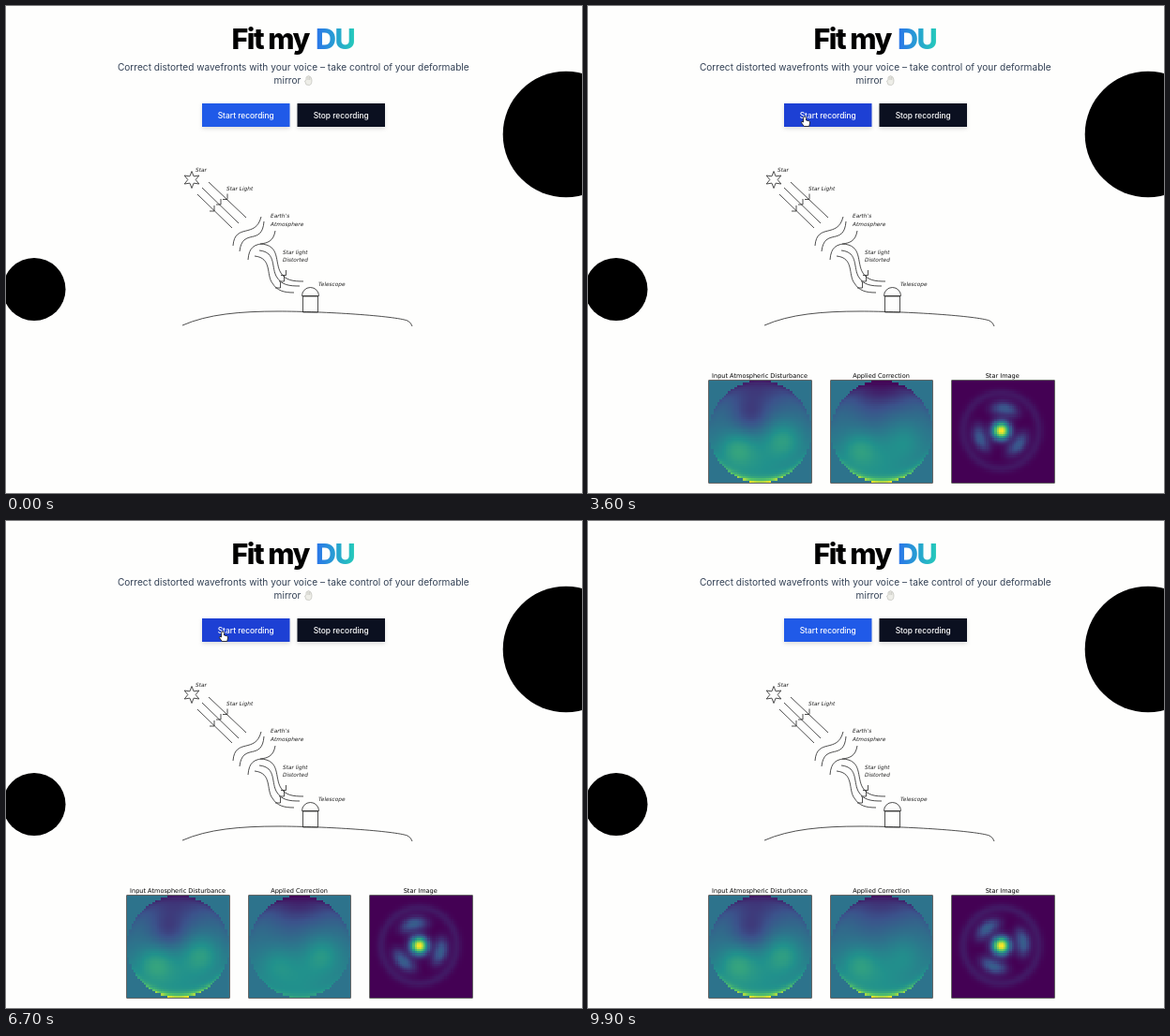
An HTML page with a canvas for the animation above (10 s loop, 614 by 520 pixels).

```html
<!DOCTYPE html>
<html lang="en">
<head>
<meta charset="utf-8">
<style>
  html, body { margin: 0; width: 100%; height: 100%; overflow: hidden; background: #fefefd; }
  svg { position: absolute; left: 0; top: 0; font-family: Inter, sans-serif; }
  canvas {
    position: absolute; top: 400px; width: 108.5px; height: 108.5px;
    image-rendering: pixelated; box-shadow: 0 0 0 .6px #000;
  }
  .title { font-size: 30.5px; font-weight: 800; letter-spacing: -.05em; }
  .lead { font-size: 10.15px; fill: #334155; text-anchor: middle; }
  .button rect { width: 93.5px; height: 25px; filter: drop-shadow(0 2px 2px #0002); }
  .button text { font-size: 8.4px; font-weight: 500; fill: #fff; text-anchor: middle; }
  .sketch { fill: none; stroke: #222; stroke-width: .8; }
  .notes { font: italic 5.8px "DejaVu Sans", sans-serif; fill: #222; }
  .captions { font: 6.55px "DejaVu Sans", sans-serif; text-anchor: middle; }
</style>
</head>
<body>
<svg width="614" height="520" viewBox="0 0 614 520">
  <defs>
    <linearGradient id="accent" gradientUnits="userSpaceOnUse" x1="330" x2="373" y1="0" y2="0">
      <stop stop-color="#2b74ea"/><stop offset="1" stop-color="#24cdb8"/>
    </linearGradient>
  </defs>
  <g class="title">
    <text x="240.5" y="45.5">Fit my</text>
    <text x="330" y="45.5" fill="url(#accent)">DU</text>
  </g>
  <g class="lead">
    <text x="306.3" y="69">Correct distorted wavefronts with your voice – take control of your deformable</text>
    <text x="300" y="83">mirror</text>
  </g>
  <path d="M320 84 L318.5 80 L320 79 V76 Q322.5 73 325 76 L326 79 Q326 84 323.5 84.5 Z M322 75.5 V79 M323.7 75.5 V79" fill="#eeeee8" stroke="#b8b8b0" stroke-width=".6"/>

  <g class="button" id="start"><rect x="209" y="104"/><text x="255.7" y="119.5">Start recording</text></g>
  <g class="button" id="stop"><rect x="310.5" y="104"/><text x="357.2" y="119.5">Stop recording</text></g>

  <g class="sketch">
    <path id="star"/>
    <path d="M216 188 L256 226 M209 194 L248 232 M204 201 L241 237"/>
    <path d="M231 206.5 H236 V200.5 M224 212 H229 V206 M217 219 H222 V213"/>
    <path d="M242 256 C244 231 266 249 272 225 M249 262 C252 236 273 257 275 230 M258 271 C260 243 283 264 287 240"/>
    <path d="M271 254 C293 255 286 274 293 285 C298 293 306 294 317 294"/>
    <path d="M270 261 C289 263 282 280 289 290 C294 298 302 299 313 299"/>
    <path d="M265 267 C284 269 277 287 284 296 C289 304 296 306 307 306"/>
    <path d="M293 287.5 H298.5 V282 M291 294 H296.5 V288 M287 301 H292.5 V295"/>
    <path d="M315.5 309.5 A9 9 0 0 1 333.5 309.5 Z M316.5 310 V327 H332.5 V310 Z"/>
    <path d="M188 341 C215 329 250 326 290 326 C340 326 415 331 428 336 Q432 338 433 342"/>
  </g>
  <g class="notes">
    <text x="202" y="177">Star</text>
    <text x="235" y="197">Star Light</text>
    <text x="282" y="226">Earth's</text>
    <text x="282" y="234.5">Atmosphere</text>
    <text x="295" y="264.5">Star light</text>
    <text x="295" y="273">Distorted</text>
    <text x="333" y="298.5">Telescope</text>
  </g>

  <g class="captions" id="captions">
    <text x="183" y="396.7">Input Atmospheric Disturbance</text>
    <text x="312.5" y="396.7">Applied Correction</text>
    <text x="441.7" y="396.7">Star Image</text>
  </g>

  <path id="hand" d="M0 0 Q1.5 0 1.5 1.5 V4 L4.5 4.8 Q6 5.3 5.5 7 L4.7 10.5 H-.7 L-3.5 6.7 Q-4 4.5 -1.5 6 V1.5 Q-1.5 0 0 0 Z" fill="#fff" stroke="#111" stroke-width=".8"/>
  <circle cx="597" cy="137" r="67.3"/>
  <circle cx="30" cy="302.5" r="33.5"/>
</svg>
<script>
const LOOP = 10, PLOTS_AT = 2.5, GRID = 48, REST = .38;
const byId = id => document.getElementById(id);
const clamp = v => Math.min(1, Math.max(0, v));
const lerp = (a, b, u) => a + (b - a) * u;
const mix = (a, b, u) => a.map((v, i) => lerp(v, b[i], u));
const gauss = (v, width) => Math.exp(-((v / width) ** 2));
const bump = (x, y, cx, cy, wx, wy = wx) => gauss(x - cx, wx) * gauss(y - cy, wy);

const viridis = [[68, 1, 84], [59, 82, 139], [33, 145, 140], [94, 201, 98], [253, 231, 37]];
function colour(value) {
  const p = clamp(value) * (viridis.length - 1), i = Math.min(Math.floor(p), viridis.length - 2);
  return mix(viridis[i], viridis[i + 1], p - i);
}

// Mirror shape: top dip, centre dip, left rise, right rise, lower rim.
const disturbance = [.13, .15, .15, .15, .55];

// How well the voice matches the disturbance, best at 4.9 s.
const match = t => gauss(t - 4.9, .9);

function correction(t) {
  const sway = .06 * Math.sin(t);
  const rim = .55 - .45 * gauss(t - 6.7, .8);
  const voice = [.3 - .015 * t, .03, .1 - sway, .1 + sway, rim];
  return mix(voice, disturbance, match(t));
}

function wavefront([top, dip, left, right, rim]) {
  return (x, y) => {
    const r = Math.hypot(x, y);
    if (r > 1) return REST;
    return REST + .08 * y + .06 * bump(x, y, 0, .55, .5)
      - top * bump(x, y, 0, -.9, .7, .4) - dip * bump(x, y, -.18, -.33, .35)
      + left * bump(x, y, -.45, .35, .35) + right * bump(x, y, .45, .15, .35)
      + r ** 14 * (y > 0 ? rim * y ** 3 : .12 * y);
  };
}

function starImage(t) {
  const halo = 1.2 - .8 * match(t), angle = .4 * t - 3.5;
  return (x, y) => {
    x += .04; y += .02;
    const r = Math.hypot(x, y);
    const lobes = .5 + .5 * Math.cos(3 * Math.atan2(y, x) + angle);
    return gauss(r, .17) + halo * (.25 * lobes * gauss(r - .44, .14) + .06 * gauss(r - .74, .09));
  };
}

const plots = [129, 258.5, 388].map(left => {
  const canvas = document.createElement('canvas');
  canvas.width = canvas.height = GRID;
  canvas.style.left = left + 'px';
  document.body.append(canvas);
  return canvas;
});

function paint(canvas, field) {
  const ctx = canvas.getContext('2d'), image = ctx.createImageData(GRID, GRID);
  const unit = n => (n + .5) / GRID * 2 - 1;
  for (let row = 0; row < GRID; row++)
    for (let col = 0; col < GRID; col++)
      image.data.set([...colour(field(unit(col), unit(row))), 255], (row * GRID + col) * 4);
  ctx.putImageData(image, 0, 0);
}

// The pointer waits behind the large circle between visits.
const hideout = [560, 150];
const moves = [[2, [231, 118]], [7.9, [357, 111]], [9.2, hideout]];
const pointerAt = t => moves.reduce((at, [start, goal]) => mix(at, goal, clamp((t - start) / .3)), hideout);

function setButton(id, left, [x, y], idle, active) {
  const over = x >= left && x <= left + 93.5 && y >= 104 && y <= 129;
  byId(id).firstChild.setAttribute('fill', over ? active : idle);
}

function draw(t) {
  const pointer = pointerAt(t);
  byId('hand').setAttribute('transform', `translate(${pointer})`);
  setButton('start', 209, pointer, '#205ae8', '#1d40d4');
  setButton('stop', 310.5, pointer, '#0b1020', '#1a2333');

  const visible = t >= PLOTS_AT;
  for (const el of [byId('captions'), ...plots]) el.style.visibility = visible ? 'visible' : 'hidden';
  if (visible) {
    paint(plots[1], wavefront(correction(t)));
    paint(plots[2], starImage(t));
  }
}

const starPoints = Array.from({ length: 12 }, (_, i) => {
  const r = i % 2 ? 4.2 : 9, a = i * Math.PI / 6;
  return [198 + r * Math.sin(a), 185.5 - r * Math.cos(a)];
});
byId('star').setAttribute('d', `M${starPoints.join('L')}Z`);
paint(plots[0], wavefront(disturbance));

const startTime = performance.now();
let lastStep = -1;
function frame() {
  const step = Math.floor((performance.now() - startTime) / 100) % (LOOP * 10);
  if (step !== lastStep) draw(step / 10);
  lastStep = step;
  requestAnimationFrame(frame);
}
frame();
</script>
</body>
</html>
```
